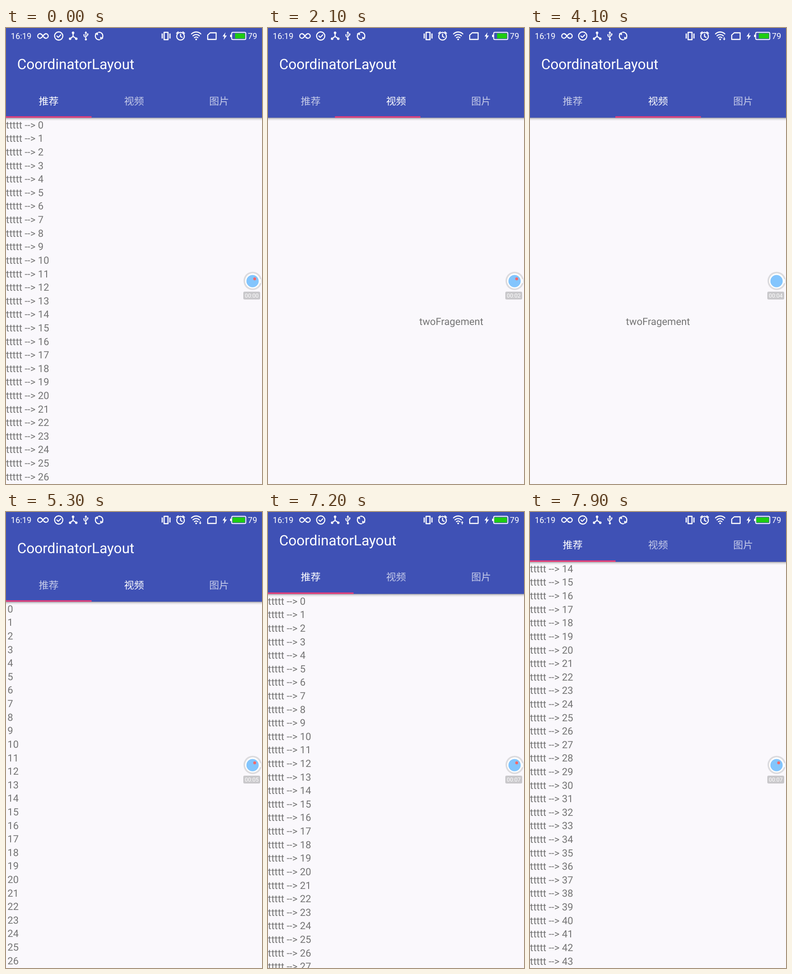
An HTML page that plays this animation: 561x998 px, repeating every 8000 ms.

```html
<!DOCTYPE html>
<html lang="zh">
<head>
<meta charset="utf-8">
<style>
html, body { margin: 0; width: 100%; height: 100%; overflow: hidden; background: #faf8fc; }
svg { display: block; width: 561px; height: 998px; font-family: Roboto, sans-serif; text-rendering: geometricPrecision; }
.page { font-size: 21.82px; fill: #747474; }
.mid { text-anchor: middle; }
.tab { font: 500 21.82px "Noto Sans CJK SC", "Noto Sans CJK", sans-serif; text-anchor: middle; fill: #fff; }
.line { fill: none; stroke: #fff; stroke-width: 2.3; stroke-linecap: round; stroke-linejoin: round; }
.solid { fill: #fff; }
</style>
</head>
<body>
<svg viewBox="0 0 561 998">
  <defs>
    <linearGradient id="shade" x2="0" y2="1">
      <stop offset="0" stop-opacity=".38"/>
      <stop offset=".4" stop-opacity=".13"/>
      <stop offset="1" stop-opacity="0"/>
    </linearGradient>
  </defs>
  <rect width="561" height="998" fill="#faf8fc"/>

  <g id="pages" class="page">
    <g id="list"></g>
    <text class="mid" x="841.5" y="649.5">twoFragement</text>
    <text class="mid" x="1402.5" y="649.5">threeFragement</text>
  </g>

  <g id="header">
    <rect y="196" width="561" height="7" fill="url(#shade)"/>
    <rect width="561" height="196.35" fill="#3f51b5"/>
    <text x="24.5" y="90.2" font-size="31.17" fill="#fff">CoordinatorLayout</text>
    <text class="tab" x="93.5" y="167.5">推荐</text>
    <text class="tab" x="280.5" y="167.5">视频</text>
    <text class="tab" x="467" y="167.5">图片</text>
    <rect id="bar" y="193.2" width="187.5" height="3.15" fill="#e93e78"/>
  </g>

  <rect width="561" height="34.3" fill="#3f51b5"/>
  <g font-size="18.2" fill="#fff">
    <text x="10.5" y="24">16:19</text>
    <text x="530" y="24">79</text>
  </g>
  <g class="line">
    <path d="M81 17.5C78 13.5 76.5 12.5 74.5 12.5a5 5 0 0 0 0 10C79.5 22.5 82.5 12.5 87.5 12.5a5 5 0 0 1 0 10C85 22.5 83.5 21 82.5 19.5"/>
    <circle cx="115.5" cy="17.5" r="9"/>
    <path d="M111.5 17.5l3 3 5.500-5.500"/>
    <path d="M147 10v8.5l-6.500 4.500M147 18.5l7 4.500"/>
    <path stroke-width="1.7" d="M175 10v14M175 21l-4-3v-3M175 19l4-3v-3"/>
    <path d="M199.5 24.500a8.300 8.300 0 0 1-1-13M208.500 10.500a8.300 8.300 0 0 1 1 13M203 9.300a8 8 0 0 1 4 .5M205 25.700a8 8 0 0 1-4-.5"/>
    <path stroke-width="2.5" d="M346.5 9.500h8.500v16h-8.500zM342.300 13v9M359.300 13v9"/>
    <circle cx="382.5" cy="18" r="8.4"/>
    <path d="M382.5 13.500v5l3.500 2M373.800 11.500l3.500-3M391.200 11.500l-3.500-3"/>
    <path d="M406.5 13a14.500 14.500 0 0 1 20.500 0M409.800 17.200a10 10 0 0 1 13.900 0M413 21.200a5.500 5.500 0 0 1 7.500 0"/>
    <path d="M447.5 10.500h13v14.500h-18.500v-9.500z"/>
    <rect x="494.5" y="9.5" width="31" height="15.7" rx="2.5" stroke-width="2"/>
  </g>
  <g class="solid">
    <circle cx="147" cy="10.5" r="2.7"/><circle cx="140.5" cy="23.5" r="2.7"/><circle cx="154" cy="23.5" r="2.7"/>
    <path d="M175 7l3 4.500h-6z"/><circle cx="175" cy="25" r="2.3"/>
    <circle cx="171" cy="15" r="1.6"/><rect x="177.5" y="12" width="3" height="3"/>
    <path d="M194.5 12.500l7-3.500v7zM213.500 22.500l-7 3.500v-7z"/>
    <circle cx="416.7" cy="24.8" r="1.9"/>
    <path id="down" d="M424.7 20h1.800v3.500h2l-2.900 3.500-2.900-3.500h2z"/>
    <path id="up" d="M424.7 27h1.800v-3.500h2l-2.900-3.500-2.900 3.500h2z"/>
    <path d="M481 9.500l-6.500 9h4l-1.500 7.500 7-9.500h-4.500z"/>
    <rect x="491" y="14.5" width="3" height="5.5" rx="1"/>
  </g>
  <rect id="charge" y="11.8" height="11.2" fill="#1fcc12"/>

  <circle cx="540.5" cy="553.5" r="20" fill="#dcdbde"/>
  <circle cx="540.5" cy="553.5" r="16.5" fill="#fff"/>
  <circle cx="540.3" cy="554" r="13.5" fill="#83c5fd"/>
  <path class="solid" d="M555 549l4 1v8l-4 1z"/>
  <circle id="dot" cx="545" cy="549" r="3.2" fill="#f26a6c"/>
  <rect x="520" y="577" width="37" height="17.3" rx="3" fill="#c9c8cb"/>
  <text id="clock" class="mid" x="538.5" y="590.2" font-size="12.2" fill="#fff"></text>
</svg>
<script>
const LOOP = 8000, WIDTH = 561, ROW = 29.61, TOOLBAR = 87.27;
const $ = id => document.getElementById(id);
const tabs = document.querySelectorAll('.tab');

$('list').innerHTML = Array.from({ length: 46 }, (_, i) =>
  `<text x="0" y="${219.8 + i * ROW}">ttttt --&gt; ${i}</text>`).join('');

const span = (t, start, length) => Math.min(1, Math.max(0, (t - start) / length));
const smooth = u => u * u * (3 - 2 * u);
const quintOut = u => 1 - (1 - u) ** 5;

// cubic-bezier(.4, 0, .2, 1)
function fastOutSlowIn(u) {
  let lo = 0, hi = 1, s;
  for (let i = 0; i < 20; i++) {
    s = (lo + hi) / 2;
    const x = 1.2 * s * (1 - s) ** 2 + 0.6 * s * s * (1 - s) + s ** 3;
    if (x < u) lo = s; else hi = s;
  }
  return 3 * s * s * (1 - s) + s ** 3;
}

// Value of the last [time, value] pair that has been reached
const at = (t, steps) => steps.filter(s => s[0] <= t).pop()[1];

const selected = [[0, 0], [2050, 1], [2550, 2], [3750, 1], [4700, 0], [5295, 1], [6195, 0]];
const dot = [[0, 1], [900, 0], [2000, 1], [3200, 0], [4400, 1], [5900, 0], [6800, 1]];
const traffic = [[0, ''], [900, 'down'], [2000, ''], [2600, 'up'], [3000, 'down'], [5900, ''], [6900, 'up'], [7500, '']];
const charge = [[0, 502], [500, 499], [1500, 496.5], [1900, 502], [2500, 499], [3000, 496.5],
  [3600, 501.5], [4600, 499], [5300, 496.5], [5900, 502], [6400, 499], [6900, 496]];

// Swipes move page and bar together
const swiped = t => smooth(span(t, 1750, 500)) + smooth(span(t, 2250, 500))
  - smooth(span(t, 3400, 650)) - smooth(span(t, 4300, 700));

// Tab taps: the page snaps faster than the bar
const tapped = (t, length, ease) => ease(span(t, 5295, length)) - ease(span(t, 6195, length));

const move = (id, x, y) => $(id).setAttribute('transform', `translate(${x} ${y})`);

function draw(t) {
  const swipe = swiped(t);
  const scroll = 502.5 * smooth(span(t, 7113, 787));
  move('pages', -WIDTH * (swipe + tapped(t, 200, quintOut)), 0);
  move('list', 0, -scroll);
  move('header', 0, -Math.min(scroll, TOOLBAR));
  $('bar').setAttribute('x', 187 * (swipe + tapped(t, 300, fastOutSlowIn)));
  tabs.forEach((tab, i) => tab.setAttribute('fill-opacity', i === at(t, selected) ? 1 : 0.7));

  const left = at(t, charge);
  $('charge').setAttribute('x', left);
  $('charge').setAttribute('width', 523.5 - left);
  for (const id of ['up', 'down']) $(id).setAttribute('opacity', at(t, traffic) === id ? 1 : 0);
  $('dot').setAttribute('opacity', at(t, dot));
  $('clock').textContent = '00:0' + Math.floor(t / 1000);
}

const start = performance.now();
function frame() {
  const t = (performance.now() - start) % LOOP;
  draw(Math.floor(t / 100) * 100);
  requestAnimationFrame(frame);
}
frame();
</script>
</body>
</html>
```
